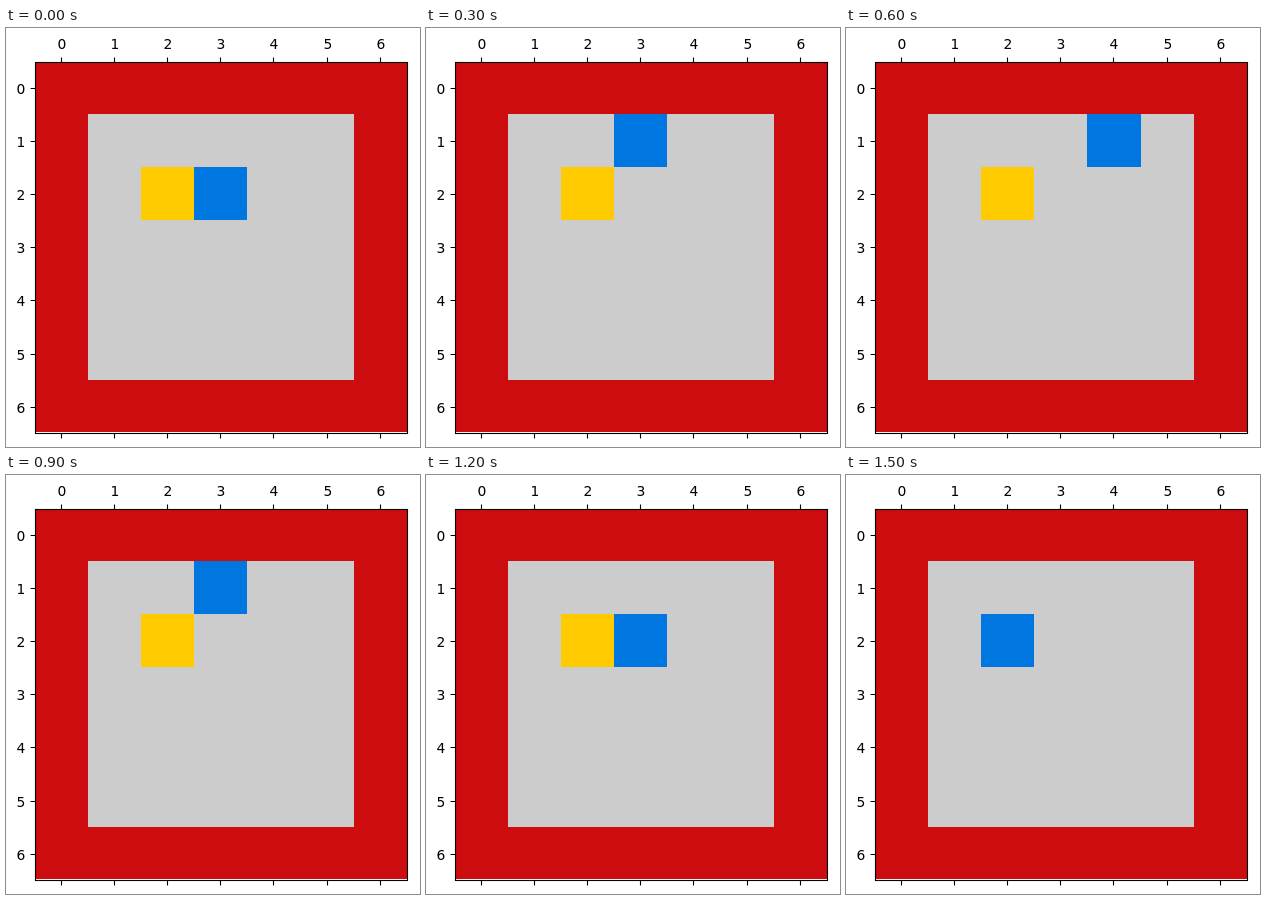
Write an HTML page that moves like this. It is 414x419 px and loops after 1.8 s.

```html
<!DOCTYPE html>
<html lang="en">
<head>
<meta charset="utf-8">
<title>Grid walk</title>
<style>
  html, body { margin: 0; width: 100%; height: 100%; overflow: hidden; background: #fff; }
  svg { display: block; }
  text { font: 13.89px "DejaVu Sans", sans-serif; }
  .line { fill: none; stroke: #000; stroke-width: 1.11px; }
  #walker {
    x: 188px; y: 139px; width: 53px; height: 53px;
    fill: #0077e0;
    animation: walk 1800ms step-end infinite;
  }
  @keyframes walk {
    0%, 66.6667% { x: 188px; y: 139px; width: 53px; }
    16.6667%, 50% { x: 188px; y: 86px; width: 53px; }
    33.3333% { x: 241px; y: 86px; width: 54px; }
    83.3333%, 100% { x: 135px; y: 139px; width: 53px; }
  }
</style>
</head>
<body>
<svg width="414" height="419" viewBox="0 0 414 419">
  <g shape-rendering="crispEdges">
    <rect x="29" y="34" width="372" height="370" fill="#cc0c0e"/>
    <rect x="82" y="86" width="266" height="266" fill="#ccc"/>
    <rect x="135" y="139" width="53" height="53" fill="#ffca00"/>
    <rect id="walker"/>
  </g>
  <rect class="line" x="29.5" y="34.5" width="372" height="371"/>
  <path class="line" id="ticks"/>
  <g id="labels"></g>
</svg>
<script>
  const CELL = 53.1;
  const labels = document.getElementById('labels');
  let ticks = '';

  function label(n, x, y, anchor) {
    const t = document.createElementNS('http://www.w3.org/2000/svg', 'text');
    t.setAttribute('x', x);
    t.setAttribute('y', y);
    t.setAttribute('text-anchor', anchor);
    t.textContent = n;
    labels.append(t);
  }

  for (let n = 0; n < 7; n++) {
    const x = Math.floor(55.5 + n * CELL) + 0.5;
    const y = Math.floor(60.5 + n * CELL) + 0.5;
    ticks += `M${x} 29.6V34.5M${x} 405.5V410.4M24.6 ${y}H29.5`;
    label(n, x + 0.5, 21, 'middle');
    label(n, 19.4, y + 5.5, 'end');
  }
  document.getElementById('ticks').setAttribute('d', ticks);
</script>
</body>
</html>
```
